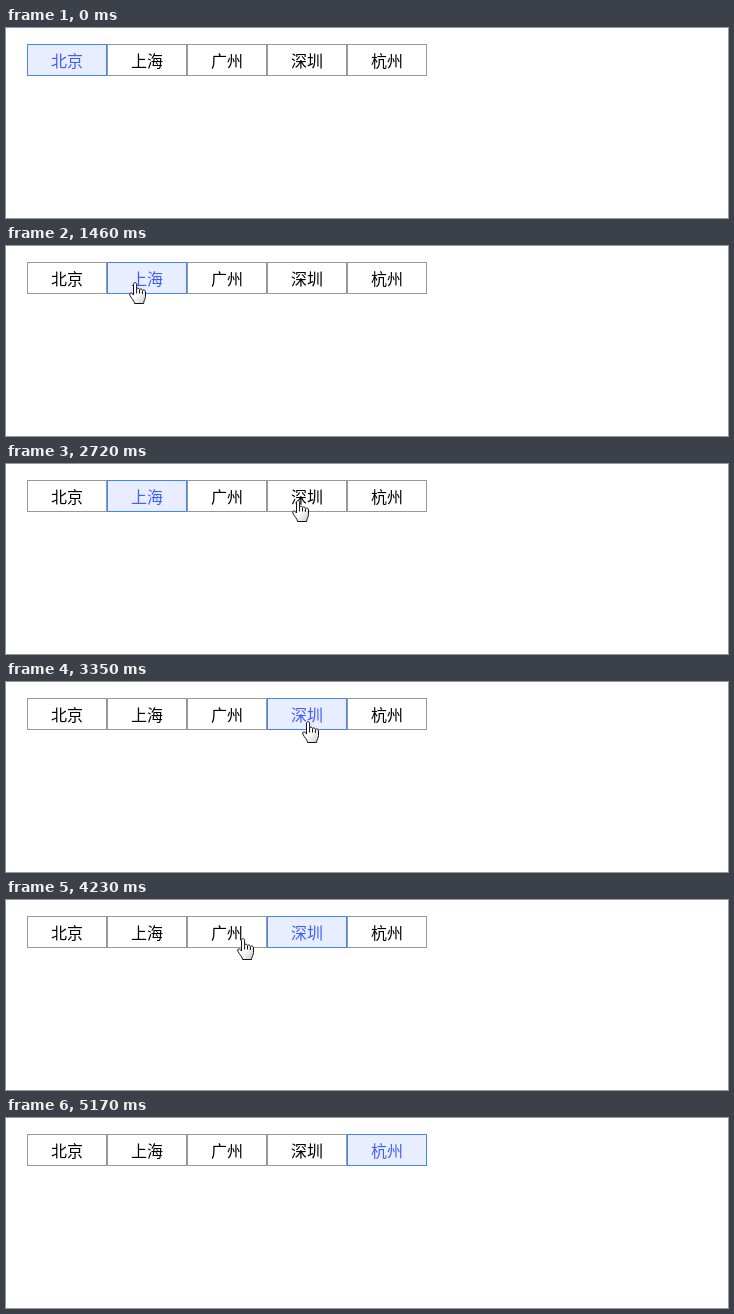
Write an HTML page that moves like this. It is 722 by 190 pixels and loops after 5790 ms.

```html
<!DOCTYPE html>
<html lang="zh-CN">
<head>
<meta charset="utf-8">
<title>Tabs</title>
<style>
  html, body { margin: 0; width: 100%; height: 100%; overflow: hidden; background: #fff; }
  svg { display: block; }
  .tab rect { fill: #fff; stroke: #999; }
  .tab text { font: 16px "Noto Sans CJK SC", "Noto Sans CJK", sans-serif; fill: #000; }
  .tab.on rect { fill: #e8eeff; stroke: #4285ff; }
  .tab.on text { fill: #3f5fff; }
  .pointer { fill: url(#shade); stroke: #111; stroke-linejoin: round; }
</style>
</head>
<body>
<svg width="722" height="190" viewBox="0 0 722 190">
  <linearGradient id="shade" x2="1" y2="1">
    <stop offset=".5" stop-color="#fff"/><stop offset="1" stop-color="#ccc"/>
  </linearGradient>
  <g id="tabs"></g>
  <g id="cursor">
    <circle id="click" r="12" fill="#ffff00" fill-opacity=".5"/>
    <path id="arrow" class="pointer" d="M.5 .8V16.6L4.2 13.2L6.6 18.5L9 17.5L6.7 12.3H11.5Z"/>
    <g id="hand" class="pointer" transform="translate(-4 0)">
      <path d="M4.5 13V2.2C4.5 .1 7.6 .1 7.6 2.2V6.9C8.4 5.7 10.3 6 10.5 7.5C11.4 6.5 13.2 6.9 13.4 8.4C14.6 7.5 16.5 8.1 16.5 9.9V14.5C16.5 17 14.8 18.2 14.6 21.5H5.6C5.3 18.6 2.6 16.8 .9 13.2C-.1 11 2.3 10.1 3.3 11.5Z"/>
      <path d="M7.6 7V11.5M10.5 8V11.5M13.4 9V12" fill="none"/>
    </g>
  </g>
</svg>
<script>
const LOOP = 5790, STEP = 80;
const $ = id => document.getElementById(id);

$("tabs").innerHTML = ["北京", "上海", "广州", "深圳", "杭州"].map((city, i) =>
  `<g class="tab" transform="translate(${21 + 80 * i} 16)">
    <rect x=".5" y=".5" width="79" height="31"/><text x="24" y="23">${city}</text></g>`).join("");
const tabs = [...document.querySelectorAll(".tab")];

const smooth = u => u * u * (3 - 2 * u);
const brake = u => 1 - (1 - u) ** 2.5;

// The pointer glides to each stop, arriving after the given number of steps.
const entry = { x: 253, y: 163 };
const moves = [
  { start: 590, steps: 7, x: 123, y: 37, ease: brake },
  { start: 1150, steps: 1, x: 127, y: 36 },
  { start: 1850, steps: 3, x: 221, y: 35 },
  { start: 2170, steps: 5, x: 290, y: 36 },
  { start: 3270, steps: 2, x: 300, y: 39 },
  { start: 3510, steps: 6, x: 188, y: 39 },
  { start: 3990, steps: 1, x: 173, y: 39 },
  { start: 4070, steps: 1, x: 187, y: 39 },
  { start: 4150, steps: 6, x: 372, y: 36 },
  { start: 5010, steps: 2, x: 528, y: 119 },
];
const visible = [510, 5170];
const clicks = [[1300, 1460], [2640, 2720], [4630, 4780]];
const selections = [[0, 0], [1460, 1], [2800, 3], [4780, 4]];

const within = (t, [from, to]) => t >= from && t < to;
const show = (id, on) => $(id).setAttribute("visibility", on ? "inherit" : "hidden");

function pointerAt(t) {
  let { x, y } = entry;
  for (const { start, steps, ease = smooth, ...stop } of moves) {
    if (t < start) break;
    const u = ease(Math.min(1, (Math.floor((t - start) / STEP) + 1) / steps));
    x += (stop.x - x) * u;
    y += (stop.y - y) * u;
  }
  return [Math.round(x), Math.round(y)];
}

function render(t) {
  const selected = selections.findLast(([start]) => start <= t)[1];
  tabs.forEach((tab, i) => tab.classList.toggle("on", i === selected));

  const [x, y] = pointerAt(t);
  const overTab = y < 48;
  $("cursor").setAttribute("transform", `translate(${x} ${y})`);
  show("cursor", within(t, visible));
  show("hand", overTab);
  show("arrow", !overTab);
  show("click", clicks.some(span => within(t, span)));
}

function tick() {
  render(performance.now() % LOOP);
  requestAnimationFrame(tick);
}
tick();
</script>
</body>
</html>
```
